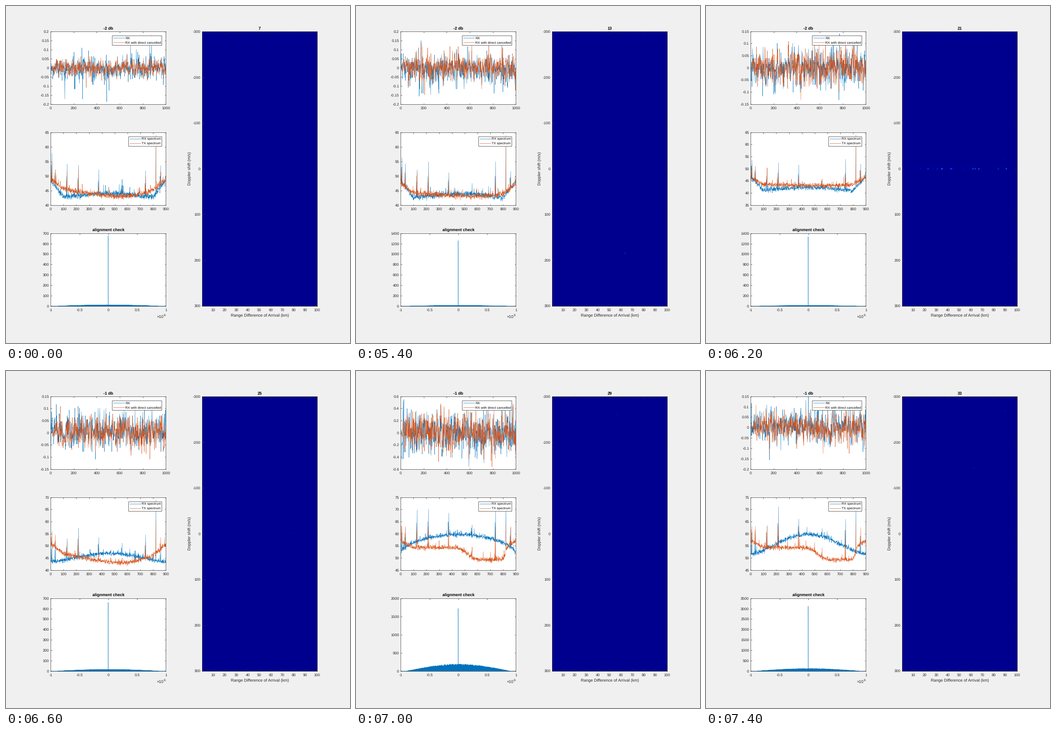
A matplotlib script that plays this animation: 756 px wide and 741 px high, repeating every 7.6 s.

```python
import numpy as np
import matplotlib.pyplot as plt
from matplotlib.animation import FuncAnimation
from matplotlib.colors import LinearSegmentedColormap
from matplotlib.patches import Rectangle

W, H, DPI = 756, 741, 64
PX = 72 / DPI  # points per pixel
BLUE, ORANGE, INK, NAVY = "#0072bd", "#d95319", "#262626", "#00008f"
HOLD, STEPS = 25, 13

plt.rcParams.update({"font.family": "Liberation Sans",
                     "axes.unicode_minus": False, "text.hinting": "none"})

# how the recording's level develops over the scans
SCANS = [7, 9, 17, 19, 21, 25, 29, 33]
HIGHEST = [.18, .115, .195, .14, .14, .115, .55, .145]
LOWEST = [-.19, -.145, -.16, -.13, -.13, -.112, -.56, -.16]
CORRELATION = [675, 1000, 1520, 1335, 1335, 660, 1720, 3120]

# narrow-band carriers: bin -> strength in dB
CARRIERS = {10: 11, 37: 9, 128: 13, 217: 15, 376: 10, 558: 5, 742: 13, 860: 8}
MAIN_CARRIER = 822

JET = LinearSegmentedColormap.from_list("radar", [
    (0, NAVY), (.11, "blue"), (.36, "cyan"), (.61, "yellow"), (1, "red")])


def ramp(scan, start):
    return float(np.clip((scan - start) / 4, 0, 1))


def surge(scan):
    return max(0, 1 - abs(scan - 29) / 4)


def noise(rng, tail):
    white = np.convolve(rng.normal(size=1002), [.3, .9, .3], "valid")
    return white * np.exp(tail * rng.normal(size=1000))


def bursts(t):
    centres = np.array([120, 203, 275, 362, 480, 690, 760, 872, 985])
    return 1.1 * np.exp(-((t[:, None] - centres) / 13) ** 2).sum(axis=1)


def traces(scan, rng):
    t = np.arange(1000)
    tail = .3 * (1 - surge(scan))
    common = noise(rng, tail)
    rx = common * (1 + bursts(t) * (scan == 7))
    up = np.interp(scan, SCANS, HIGHEST) / rx.max()
    down = np.interp(scan, SCANS, LOWEST) / rx.min()
    cancelled = (.6 * common + .7 * noise(rng, tail)) * (up + down) / 2
    cancelled *= np.clip(t / 45, .05, 1)
    rx = np.where(rx > 0, up, down) * rx
    cancelled = np.clip(cancelled, rx.min(), rx.max())
    return [np.round(v * 128) / 128 for v in (rx, cancelled)]


def edge_lift(f):
    return np.clip(1 - np.minimum(f, 900 - f) / 100, 0, 1)


def rx_floor(scan, f):
    mid, late = ramp(scan, 21), ramp(scan, 25)
    level = np.interp(scan, [9, 17, 19, 21, 25, 29],
                      [42.4, 42.1, 40.7, 40.7, 43.4, 51.5])
    dome = (1.6 + 2 * mid + 4.6 * late) \
        * np.sin(np.pi * f / 900).clip(0) ** (1.5 - surge(scan))
    return level + dome + 6 * (1 - mid) * edge_lift(f)


def tx_floor(scan, f):
    late = ramp(scan, 25)
    bowl = np.interp(scan, [7, 17, 21, 25, 29], [3.3, .7, .7, 5, 0])
    reach = np.abs(f - 560) / np.where(f < 560, 560, 340)
    plateau = 1 / (1 + np.exp((520 - f) / 25)) / (1 + np.exp((f - 820) / 8))
    return (43 + 11.3 * late + bowl * reach ** 1.5
            + 2.7 * edge_lift(f) - 5 * late * plateau)


def spectrum(rng, floor, main, gain):
    y = floor + rng.normal(0, .5, floor.size).clip(-1.6)
    y[rng.integers(0, 900, 16)] += rng.uniform(1, 3, 16)
    for at, strength in CARRIERS.items():
        lift = strength * gain * rng.uniform(.65, 1)
        y[at] = min(floor[at] + lift, main - 1)
        y[at - 5] += .55 * lift
    y[MAIN_CARRIER] = main
    return y


def alignment(scan, rng):
    x = np.linspace(-1, 1, 2001)
    width = np.cos(np.pi / 2 * np.clip(x / .9, -1, 1))
    height = 12 + 5 * ramp(scan, 21) + 108 * ramp(scan, 25) + 65 * surge(scan)
    y = height * width * rng.uniform(.75, 1.03, x.size)
    y[::2] = 0
    y[1000] = np.interp(scan, SCANS, CORRELATION)
    return x, y


def doppler_map(scan, rng):
    grid = np.zeros((601, 100))
    grid[rng.integers(0, 601, 25), rng.integers(13, 100, 25)] = \
        rng.exponential(.04, 25).clip(0, .3)
    clutter = .3 * np.exp(-((scan - 21) / 3) ** 2)
    grid[300, rng.integers(13, 95, 20)] = clutter * rng.uniform(.1, 1, 20)
    return grid


fig = plt.figure(figsize=(W / DPI, H / DPI), dpi=DPI, facecolor="#f0f0f0")


def panel(x, y, h, tick, color="white"):
    # a quarter pixel keeps the frame on the intended pixel after snapping
    x, y, w = x - .25, y + .25, 253
    ax = fig.add_axes([x / W, 1 - (y + h) / H, w / W, h / H], facecolor=color)
    ax.tick_params(direction="in", top=True, right=True, length=tick * PX,
                   width=.7 * PX, color=INK, labelcolor=INK,
                   labelsize=8.4 * PX)
    ax.tick_params(axis="x", pad=5 * PX)
    ax.tick_params(axis="y", pad=3.5 * PX)
    for spine in ax.spines.values():
        spine.set(color=INK, linewidth=.7 * PX)
    return ax


def steps(low, high, step):
    values = step * np.arange(round(low / step), round(high / step) + 1)
    return values, [f"{round(v, 6) + 0.0:g}" for v in values]


def x_axis(ax, low, high, step):
    ax.set_xlim(low, high)
    ax.set_xticks(*steps(low, high, step))


def fit_y(ax, step, *series):
    low = step * np.floor(min(s.min() for s in series) / step)
    high = step * np.ceil(max(s.max() for s in series) / step)
    ax.set_yticks(*steps(low, high, step))
    ax.set_ylim(low, high)


def trace(ax, color):
    return ax.plot([], [], color=color, lw=.5 * PX)[0]


time_ax = panel(98.5, 55.5, 160, 2.5)
spec_ax = panel(98.5, 277.5, 160, 2.5)
align_ax = panel(98.5, 499.5, 160, 2.5)
map_ax = panel(431.5, 55.5, 604, 6, NAVY)

x_axis(time_ax, 0, 1000, 200)
x_axis(spec_ax, 0, 900, 100)
x_axis(align_ax, -1, 1, .5)

rx_line, cancelled_line = trace(time_ax, BLUE), trace(time_ax, ORANGE)
rx_spec, tx_spec = trace(spec_ax, BLUE), trace(spec_ax, ORANGE)
align_line = trace(align_ax, BLUE)
image = map_ax.imshow(np.zeros((601, 100)), cmap=JET, vmin=0, vmax=1,
                      extent=[.5, 100.5, 300.5, -300.5], aspect="auto",
                      interpolation="nearest")
map_ax.set_xticks(range(10, 101, 10))
map_ax.set_yticks(range(-300, 301, 100))
map_ax.set(xlim=(.5, 100.5), ylim=(300.5, -300.5))

# pixel-coordinate layer for titles, labels and legends
overlay = fig.add_axes([0, 0, 1, 1], zorder=5)
overlay.set(xlim=(0, W), ylim=(H, 0))
overlay.axis("off")


def label(x, y, text, size, ha="center", va="baseline", **style):
    style.setdefault("color", INK)
    return overlay.text(x, y, text, fontsize=size * PX, ha=ha, va=va, **style)


def title(x, y, text=""):
    return label(x, y, text, 9, color="black", weight="bold")


def legend(x, y, names):
    overlay.add_patch(Rectangle((x - .25, y + .25), 342.5 - x, 21, fc="white",
                                ec=INK, lw=.7 * PX))
    for k, (name, color) in enumerate(zip(names, (BLUE, ORANGE))):
        row = y + 5.7 + 10.2 * k
        overlay.plot([x + 2.5, x + 26.5], [row, row], color=color, lw=.7 * PX)
        label(x + 28.5, row + 2.6, name, 7.4, ha="left", color="black")


legend(233.5, 64.5, ["RX", "RX with direct cancelled"])
legend(269.5, 286.5, ["RX spectrum", "TX spectrum"])
gain_title = title(225, 51.5)
scan_title = title(557.5, 51.5)
title(225, 495.5, "alignment check")
label(557.5, 683, "Range Difference of Arrival (km)", 9)
label(403.5, 357.5, "Doppler shift (m/s)", 9, va="center", rotation=90)
label(346, 685.5, "×10", 8.8, ha="right")
label(346.2, 681.5, "6", 7, ha="left")


def draw(frame):
    scan = 7 + 2 * max(0, frame - HOLD + 1)
    rng = np.random.default_rng(scan)
    mid, late = ramp(scan, 21), ramp(scan, 25)

    rx, cancelled = traces(scan, rng)
    rx_line.set_data(np.arange(1000), rx)
    cancelled_line.set_data(np.arange(1000), cancelled)
    fit_y(time_ax, .05 if rx.max() < .3 else .2, rx)

    f = np.arange(901)
    rx_power = spectrum(rng, rx_floor(scan, f), 64 + 5 * mid + 4 * late, 1)
    tx_power = spectrum(rng, tx_floor(scan, f), 60 + 4 * late,
                        .6 + .6 * late)
    rx_spec.set_data(f, rx_power)
    tx_spec.set_data(f, tx_power)
    fit_y(spec_ax, 5, rx_power, tx_power)

    x, match = alignment(scan, rng)
    align_line.set_data(x, match)
    top = match.max()
    fit_y(align_ax, 100 if top < 800 else 200 if top < 1600 else 500, match)

    image.set_data(doppler_map(scan, rng))
    gain_title.set_text("-2 db" if scan < 25 else "-1 db")
    scan_title.set_text(str(scan))
    return []


anim = FuncAnimation(fig, draw, frames=HOLD + STEPS, interval=200,
                     repeat=True, repeat_delay=0, blit=False)
plt.show()
```
